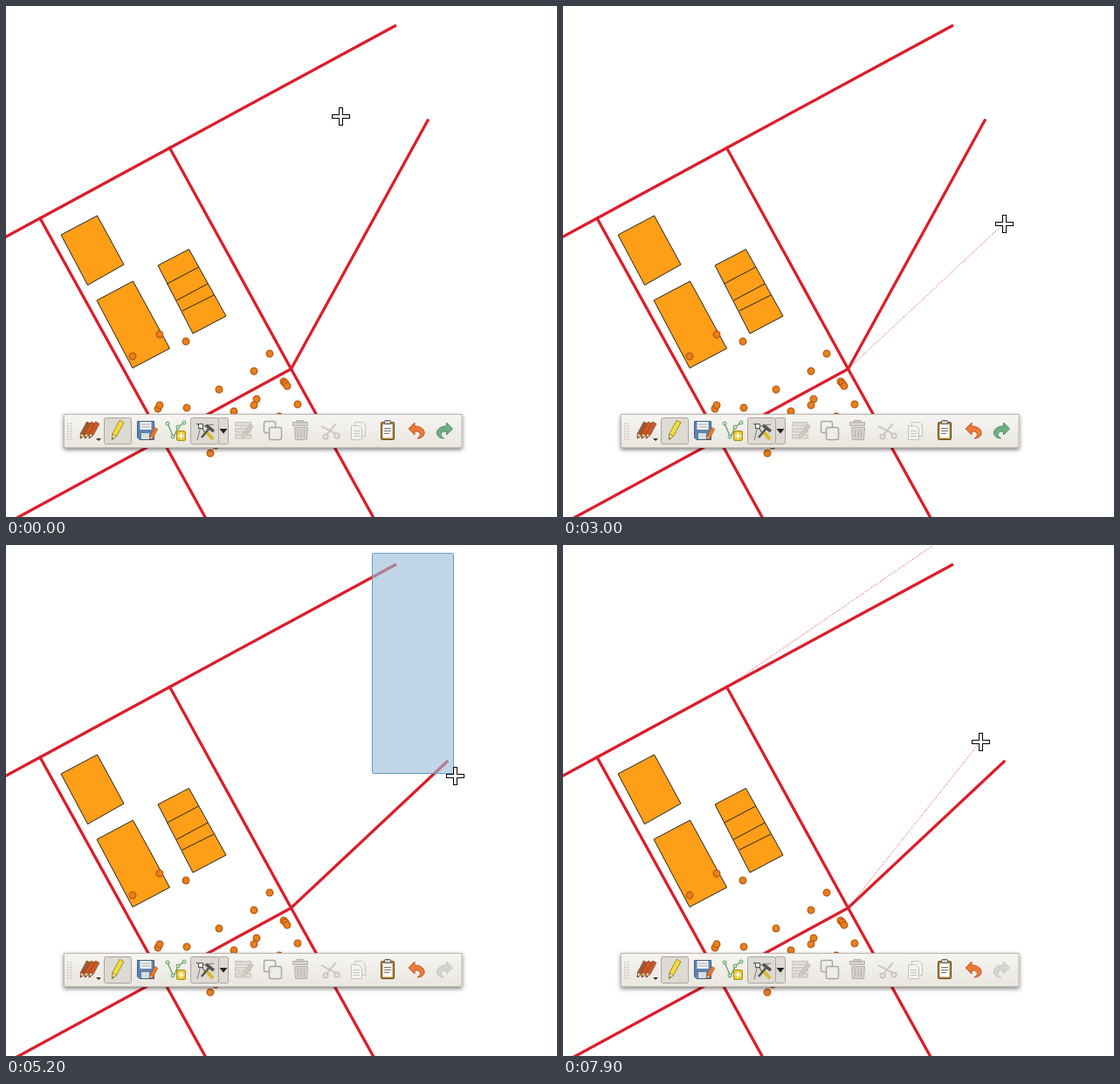
Recreate the animation shown at these times as an HTML page. Size 631x585 px, loop 8000 ms.

```html
<!DOCTYPE html>
<html lang="ca">
<head>
<meta charset="utf-8">
<title>Vertex editing</title>
<style>
  html, body { margin: 0; width: 100%; height: 100%; overflow: hidden; background: #fff; }
  svg { display: block; }
  .road { fill: none; stroke: #db1e2a; stroke-width: 3.3; stroke-linecap: square; stroke-linejoin: bevel; }
  .plot { fill: #ff9e17; stroke: #232323; stroke-width: 1; stroke-linejoin: bevel; }
  .point circle { fill: #e8801c; stroke: #b8560f; stroke-width: 1.3; }
  .band { fill: none; stroke: #e02535; stroke-width: 1; stroke-dasharray: 1 2; }
  .glow { fill: none; stroke: #f00; stroke-opacity: .75; stroke-width: 2; }
  .blue { fill: none; stroke: #0000e0; stroke-width: 2; }
  .pressed { fill: #dddad4; stroke: #aaa69f; }
  .line { fill: none; stroke-linejoin: round; }
  .tip { font: 11px Inter, "Open Sans", sans-serif; font-feature-settings: "cv11"; }
</style>
</head>
<body>
<svg width="631" height="585" viewBox="0 0 631 585">
  <defs>
    <linearGradient id="panel" x2="0" y2="1">
      <stop stop-color="#f6f5f2"/><stop offset="1" stop-color="#e9e6df"/>
    </linearGradient>
    <filter id="shade" x="-10%" y="-30%" width="120%" height="180%">
      <feDropShadow dx="0" dy="2" stdDeviation="2.5" flood-opacity=".5"/>
    </filter>
    <path id="turn" d="M-9 -2 L-2 -9 V-5 C5 -5 10 -1 9 4 C8 7 5 9 1 9 C4 7 5 5 4 3 C3 1 1 1 -2 1 V5 Z"/>
    <g id="pencil">
      <path d="M-2.5 -10 H2.5 V5 L0 10 L-2.5 5 Z"/>
      <path d="M-2.5 5 L0 10 L2.5 5 Z" fill="#f3dfb5"/>
      <path d="M-.8 8.4 L0 10 L.8 8.4 Z" fill="#333"/>
    </g>
  </defs>

  <g class="plot">
    <path d="M63 262 L104.500 240 L135 296 L93.500 319.500 Z"/>
    <path d="M104 337 L145.500 315 L187.500 392 L145 414.500 Z"/>
    <path d="M174 297 L209.500 278.500 L252 355 L214 375 Z M184.500 318 L220.500 299 M195.500 337 L231 318 M202 349 L238 331"/>
  </g>
  <g class="road">
    <path d="M-10 269.500 L39 243 L187.500 162.500 L445.500 22.800"/>
    <path d="M39 243 L233.500 595"/>
    <path d="M187.500 162.500 L326.500 415.500 L426 595"/>
    <path d="M326.500 415.500 L-4 595"/>
    <path id="arm"/>
  </g>
  <g class="point" id="points"></g>

  <g id="hover">
    <path class="glow" id="glow"/>
    <circle cx="326.500" cy="415" r="3.300" fill="#ee0d19"/>
    <circle class="glow" id="ring" r="7.500"/>
    <path id="extend" d="M-6 0 H6 M0 -6 V6" stroke="#a8a8a8" stroke-width="3.500"/>
  </g>
  <path class="band" id="bandA"/>
  <path class="band" id="bandB"/>
  <g class="blue" id="chosen">
    <circle cx="446" cy="22.500" r="4.300"/>
    <circle cx="505" cy="248" r="4.300"/>
  </g>
  <rect id="area" x="419.500" y="9.500" rx="1" fill="#96bbd5" fill-opacity=".6" stroke="#649cc6"/>

  <g>
    <rect x="66.500" y="467.500" width="455.500" height="38" fill="url(#panel)" stroke="#bdb9b1" filter="url(#shade)"/>
    <path d="M71 477 V498 M74.500 477 V498" stroke="#c2beb7" stroke-width="1.500" stroke-dasharray="1.500 1.500"/>
    <rect class="pressed" x="112.500" y="471.500" width="31" height="30" rx="2"/>
    <rect class="pressed" x="211.500" y="471.500" width="32" height="30" rx="2"/>
    <rect class="pressed" x="243.500" y="471.500" width="11" height="30" rx="2"/>
    <path d="M244.500 484 H253.500 L249 489.500 Z" fill="#222"/>

    <g stroke="#8b4a20" stroke-width=".7">
      <use href="#pencil" transform="translate(90 486) rotate(28)" fill="#9b5a35"/>
      <use href="#pencil" transform="translate(95 486) rotate(28)" fill="#d9541e"/>
      <use href="#pencil" transform="translate(100 486) rotate(28)" fill="#c65a2e"/>
    </g>
    <path d="M103 495 H109 L106 498 Z" fill="#333"/>
    <use href="#pencil" transform="translate(127 486) rotate(28) scale(1.1 1.180)" fill="#f0dc3c" stroke="#94872a" stroke-width=".7"/>

    <path d="M150.500 475.500 H169.500 V496.500 H153 L150.500 494 Z" fill="#5c83ae" stroke="#3d5f86"/>
    <rect x="153.500" y="476" width="13" height="9" fill="#f1f1f1"/>
    <path d="M155 479 H165 M155 482 H165" stroke="#aaa"/>
    <rect x="155" y="489" width="9" height="7" fill="#d8dde3"/>
    <use href="#pencil" transform="translate(168.500 490) rotate(28) scale(.8 .75)" fill="#e8792a" stroke="#a84c14" stroke-width=".7"/>

    <path class="line" d="M185 478 L192 494 L197 482 L204 477" stroke="#5d9c5d" stroke-width="1.200"/>
    <g fill="#d7ead4" stroke="#5d9c5d">
      <circle cx="185" cy="478" r="2"/><circle cx="191" cy="493" r="2"/><circle cx="204" cy="477" r="2"/><circle cx="197" cy="482" r="2"/>
    </g>
    <rect x="195.500" y="486.500" width="10" height="11" rx="1.500" fill="#e3c62f" stroke="#a88f14"/>
    <path d="M200.500 488 V496 M196.500 492 H204.500 M198 489.500 L203 494.500 M203 489.500 L198 494.500" stroke="#fff"/>

    <path class="line" d="M219 497 L223 481 L238 479" stroke="#777"/>
    <path class="line" d="M218 478 L223 481 L229 490" stroke="#333"/>
    <rect x="220.500" y="478.500" width="5" height="5" fill="#eee" stroke="#555"/>
    <path d="M230 488 L237 496" stroke="#d8b928" stroke-width="4"/>
    <path d="M224 494 L234 482" stroke="#555" stroke-width="2.500"/>
    <path d="M229 480 L238 487" stroke="#555" stroke-width="3.500"/>

    <g stroke="#c4c1bb" fill="#dedbd5">
      <path d="M262.500 476.500 H280.500 V481 H262.500 Z M262.500 483.500 H280.500 V488 H262.500 Z M262.500 490.500 H280.500 V495 H262.500 Z"/>
      <use href="#pencil" transform="translate(276 487) rotate(38) scale(.9)" fill="#cbc8c1"/>
    </g>
    <g class="line" stroke="#aaa7a2" stroke-width="1.500">
      <rect x="295.500" y="475.500" width="13" height="13" rx="2"/>
      <rect x="301.500" y="482.500" width="14" height="14" rx="2" fill="#efede8"/>
    </g>
    <g stroke="#b3b0aa" fill="#d4d1cb">
      <path d="M328.500 476.500 H345.500 V480.500 H328.500 Z M333 476 V474.500 H341 V476"/>
      <path d="M330.500 482.500 H345.500 L344.500 496.500 H331.500 Z"/>
      <path d="M334.500 485 V494 M338 485 V494 M341.500 485 V494"/>
    </g>
    <g class="line" stroke="#c6c3bd" stroke-width="1.800">
      <path d="M361 481 L378 490 M378 478 L367 491"/>
      <circle cx="379" cy="492" r="2.700"/><circle cx="366" cy="493" r="2.700"/>
    </g>
    <g fill="#f2f1ee" stroke="#c6c3bd">
      <path d="M399.500 476.500 H408 L411.500 480 V492.500 H399.500 Z"/>
      <path d="M395.500 480.500 H404 L407.500 484 V496.500 H395.500 Z"/>
      <path d="M398 486.500 H405 M398 489.500 H405 M398 492.500 H405"/>
    </g>
    <rect x="429.500" y="476.500" width="15" height="20" rx="1" fill="#b97c28" stroke="#555036"/>
    <rect x="431.500" y="479" width="11" height="15.500" fill="#fff"/>
    <rect x="433.500" y="474.500" width="7" height="4" rx="1" fill="#ccc" stroke="#555"/>
    <path d="M433 483.500 H441 M433 486.500 H441 M433 489.500 H439" stroke="#777"/>
    <use href="#turn" transform="translate(470 486)" fill="#ea7a3c" stroke="#c5561d"/>
    <use href="#turn" id="redo" transform="translate(502.500 486) scale(-1 1)"/>
  </g>

  <g id="snap">
    <rect x="478" y="126.500" width="9" height="9.500" fill="none" stroke="#f0e" stroke-width="2"/>
    <g id="label">
      <rect x="484.500" y="146.500" width="61" height="19" fill="#ffffdc" stroke="#222" filter="url(#shade)"/>
      <text class="tip" x="515" y="158" text-anchor="middle" textLength="">capa_linia</text>
    </g>
  </g>
  <g id="cursor">
    <path d="M-10.500 0 H10.500 M0 -10.500 V10.500" stroke="#000" stroke-width="5"/>
    <path d="M-9.500 0 H9.500 M0 -9.500 V9.500" stroke="#fff" stroke-width="3"/>
  </g>
</svg>
<script>
  const $ = id => document.getElementById(id);
  const LOOP = 8000, STEP = 100;
  const joint = [326.5, 415.5], corner = [187.5, 162.5];
  const before = [483, 131], after = [505, 248];

  // Pointer stops: time, x, y
  const stops = [
    [100, 383, 126], [1000, 484, 131], [1100, 483, 131], [1900, 483, 131],
    [2000, 488, 133], [2400, 492, 143], [2700, 492, 143], [3000, 505, 249],
    [3500, 505, 249], [4300, 420, 10], [4400, 420, 10], [5200, 514, 264],
    [5300, 526, 277], [5400, 539, 283], [5800, 539, 283], [6700, 508, 250],
    [6900, 504, 247], [7300, 504, 247], [7400, 526, 240], [7600, 561, 232],
    [7900, 478, 225]
  ];

  const spots = [
    [145, 401], [176, 376], [206, 384], [302, 398], [284, 418], [244, 439],
    [318, 430], [320, 432], [322, 435], [287, 450], [284, 457], [334, 456],
    [174, 461], [176, 457], [207, 460], [261, 464], [313, 470], [240, 503], [234, 512]
  ];
  $('points').innerHTML = spots.map(([x, y]) => `<circle cx="${x}" cy="${y}" r="3.8"/>`).join('');
  document.querySelector('.tip').removeAttribute('textLength');

  function pointer(t) {
    if (t <= stops[0][0]) return stops[0].slice(1);
    const i = stops.findIndex(s => s[0] >= t);
    const [t0, x0, y0] = stops[i - 1], [t1, x1, y1] = stops[i];
    const k = (t - t0) / (t1 - t0);
    return [Math.round(x0 + (x1 - x0) * k), Math.round(y0 + (y1 - y0) * k)];
  }

  const set = (id, attrs) => { for (const k in attrs) $(id).setAttribute(k, attrs[k]); };
  const show = (id, on) => set(id, { visibility: on ? 'visible' : 'hidden' });
  const segment = (a, b) => `M${a} L${b}`;

  function draw(t) {
    const within = (a, b) => t >= a && t < b;
    const [x, y] = pointer(t);
    const end = t < 3300 ? before : after;
    const snapped = within(2000, 2300);
    const firstDrag = within(2000, 3300), secondDrag = t >= 7400;

    set('cursor', { transform: `translate(${x + .5} ${y + .5})` });
    set('arm', { d: segment(joint, end) });

    const dx = end[0] - joint[0], dy = end[1] - joint[1], len = Math.hypot(dx, dy);
    set('glow', { d: `M${end} L${joint} L190 489.5` });
    set('ring', { cx: end[0], cy: end[1] });
    set('extend', { transform: `translate(${end[0] + dx / len * 15} ${end[1] + dy / len * 15})` });
    show('hover', within(900, 2000) || within(6400, 7400));

    show('snap', snapped);
    set('label', { transform: `translate(${x - 488} ${y - 133})` });
    show('bandA', firstDrag || secondDrag);
    set('bandA', { d: segment(joint, snapped ? before : [x, y]) });
    show('bandB', secondDrag);
    set('bandB', { d: segment(corner, [446 + x - 501, 22 + y - 246]) });

    show('chosen', within(5600, 7200));
    show('area', within(4500, 5600));
    const lag = t < 5400 ? 2 : 0;
    set('area', { width: Math.max(0, x - 420 - lag / 2), height: Math.max(0, y - 10 - lag) });
    set('redo', t < 3400 ? { fill: '#6fae86', stroke: '#4b8a62' } : { fill: '#d6d4cf', stroke: '#c6c4be' });
  }

  const start = performance.now();
  function tick() {
    const t = (performance.now() - start) % LOOP;
    draw(Math.floor(t / STEP) * STEP);
    requestAnimationFrame(tick);
  }
  tick();
</script>
</body>
</html>
```
